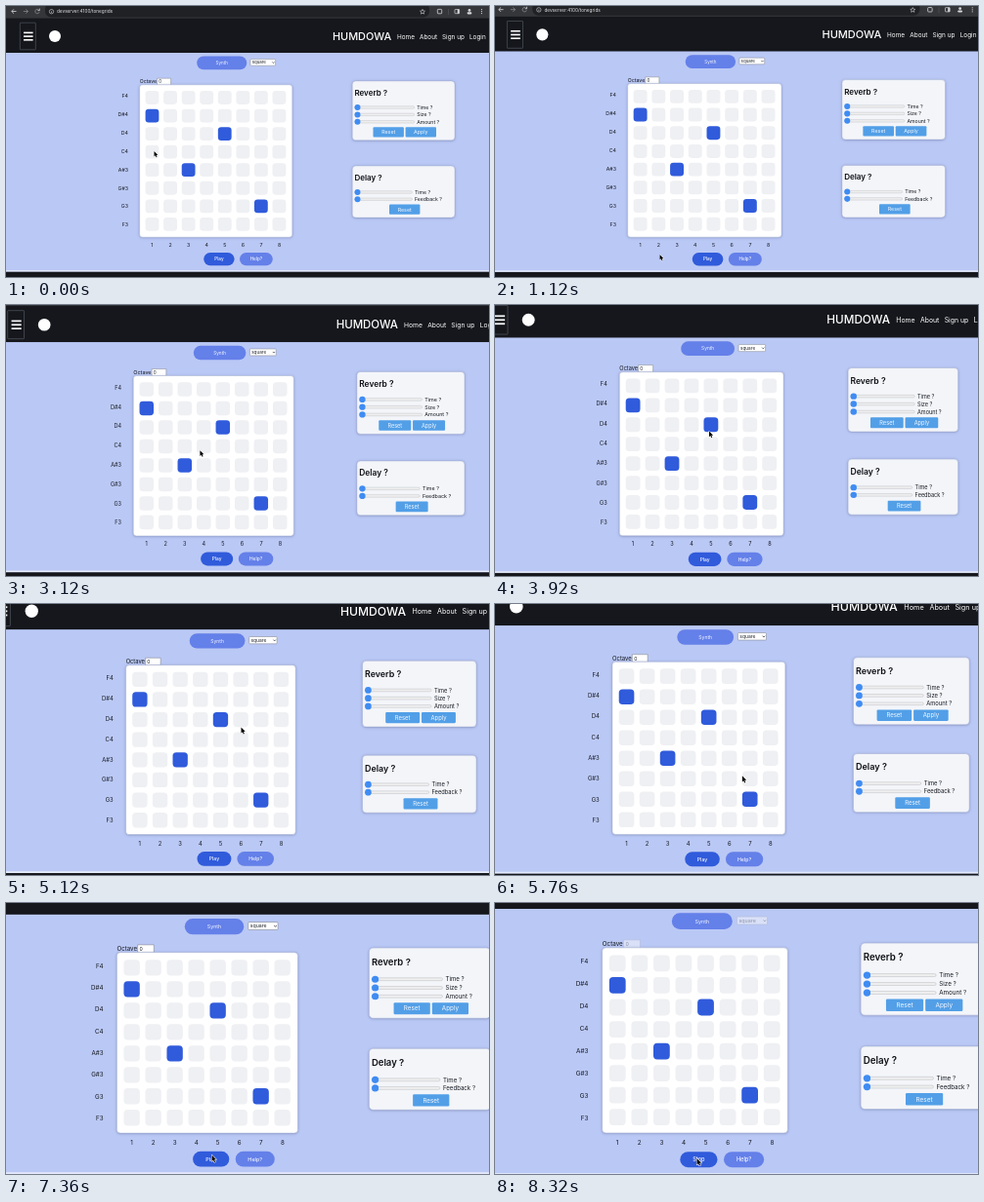
These frames come from a looping animation (494 by 278 pixels, 8400 ms). An HTML page with a canvas:

```html
<!DOCTYPE html>
<html lang="en">
<head>
<meta charset="utf-8">
<title>Step sequencer</title>
<style>
html, body { margin: 0; width: 100%; height: 100%; overflow: hidden; background: #bac8f5; }
canvas { display: block; width: 494px; height: 278px; }
</style>
</head>
<body>
<canvas id="stage"></canvas>
<script>
const W = 494, H = 278, LOOP = 8400, STEP = 80, CLICK = 7700;
const FOCUS = { x: 262, y: 243 };
const FONT = 'Inter, "Open Sans", sans-serif';
const BLUE = '#305bdb', SOFT = '#6480e9', SKY = '#529fe7', BAR = '#15171c';

// time, extra zoom, zoom speed per ms
const ZOOM = [
  [0, 0, 0], [1120, 0.0077, 1.3e-5], [2320, 0.03, 2.35e-5], [3920, 0.0745, 3e-5],
  [5120, 0.112, 3.2e-5], [6480, 0.157, 3.3e-5], [8400, 0.2178, 3e-5]
];
// time, x, y of the pointer tip
const POINTER = [
  [0, 151.5, 149], [250, 151.5, 149], [950, 168.5, 255], [1300, 168.5, 255],
  [2150, 183, 164], [2600, 183, 164], [3750, 219, 129.5], [4100, 219, 129.5],
  [5120, 240.5, 126.5], [6300, 262.5, 215], [6650, 262.5, 215],
  [7500, 206.5, 262], [8400, 206.5, 262]
];
const NOTES = ['F4', 'D#4', 'D4', 'C4', 'A#3', 'G#3', 'G3', 'F3'];
const ACTIVE = { 1: 0, 2: 4, 4: 2, 6: 6 }; // row: column

const canvas = document.getElementById('stage');
const ctx = canvas.getContext('2d');
const dpr = window.devicePixelRatio || 1;
canvas.width = Math.round(W * dpr);
canvas.height = Math.round(H * dpr);

function segment(keys, t) {
  let i = 0;
  while (i < keys.length - 2 && t >= keys[i + 1][0]) i++;
  const a = keys[i], b = keys[i + 1], span = b[0] - a[0];
  return { a, b, span, u: (t - a[0]) / span };
}

function zoomAt(t) {
  const { a, b, span, u } = segment(ZOOM, t);
  const ease = u * u * (3 - 2 * u);
  const v = u * (1 - u);
  return 1 + a[1] + (b[1] - a[1]) * ease + span * v * ((1 - u) * a[2] - u * b[2]);
}

function pointerAt(t) {
  const { a, b, u } = segment(POINTER, t);
  const k = u * u * (3 - 2 * u);
  return [a[1] + (b[1] - a[1]) * k, a[2] + (b[2] - a[2]) * k];
}

function rect(x, y, w, h, fill) {
  ctx.fillStyle = fill;
  ctx.fillRect(x, y, w, h);
}

function box(x, y, w, h, r, fill, stroke, line = 0.6) {
  ctx.beginPath();
  ctx.roundRect(x, y, w, h, r);
  if (fill) { ctx.fillStyle = fill; ctx.fill(); }
  if (stroke) { ctx.strokeStyle = stroke; ctx.lineWidth = line; ctx.stroke(); }
}

function disc(x, y, r, fill) {
  ctx.beginPath();
  ctx.arc(x, y, r, 0, Math.PI * 2);
  ctx.fillStyle = fill;
  ctx.fill();
}

function path(points, color, line = 0.8) {
  ctx.beginPath();
  points.forEach(([x, y], i) => i ? ctx.lineTo(x, y) : ctx.moveTo(x, y));
  ctx.strokeStyle = color;
  ctx.lineWidth = line;
  ctx.stroke();
}

// y is the middle of the capital letters
function text(str, x, y, size, color = '#15181f', align = 'left', weight = 400) {
  ctx.font = `${weight} ${size}px ${FONT}`;
  ctx.textAlign = align;
  ctx.fillStyle = color;
  ctx.fillText(str, x, y + size * 0.364);
}

function button(label, x, y, w, h, r, fill, size, weight = 400) {
  box(x, y, w, h, r, fill);
  text(label, x + w / 2, y + h / 2, size, '#f4f7ff', 'center', weight);
}

function card(x, y, w, h, r, fill) {
  ctx.save();
  ctx.shadowColor = 'rgba(60,75,130,0.55)';
  ctx.shadowBlur = 2.5 * dpr;
  ctx.shadowOffsetY = 0.4 * dpr;
  box(x, y, w, h, r, fill);
  ctx.restore();
  box(x, y, w, h, r, null, '#a9b4d6', 0.5);
}

function slider(label, y, end) {
  box(356.6, y - 1.2, end - 356.6, 2.4, 1.2, '#efefef', '#b5b7bd', 0.4);
  disc(359.5, y, 3, '#3f8cf3');
  text(label, end + 2.6, y, 5.15);
}

function browserBar() {
  rect(-60, -10, 620, 23, '#35363a');
  box(40, -3, 393, 14.5, 6, '#202124');
  const c = '#d5d7da';
  path([[10.5, 5.5], [5.8, 5.5]], c);
  path([[8, 3.3], [5.8, 5.5], [8, 7.7]], c);
  path([[17.8, 5.5], [22.5, 5.5]], '#85878b');
  path([[20.3, 3.3], [22.5, 5.5], [20.3, 7.7]], '#85878b');
  ctx.beginPath();
  ctx.arc(32, 5.5, 2.2, 0.3, 5.5);
  ctx.stroke();
  path([[34.3, 2.6], [34.3, 4.6], [32.4, 4.6]], c);
  ctx.beginPath();
  ctx.arc(46.5, 5.7, 2.2, 0, Math.PI * 2);
  ctx.lineWidth = 0.6;
  ctx.stroke();
  path([[46.5, 5.3], [46.5, 7]], c, 0.6);
  text('devserver:4100/tonegrids', 52, 5.7, 4.7, '#e4e6e9');

  const star = [];
  for (let i = 0; i <= 10; i++) {
    const a = i * Math.PI / 5 - Math.PI / 2, r = i % 2 ? 1.2 : 2.6;
    star.push([426 + Math.cos(a) * r, 6 + Math.sin(a) * r]);
  }
  path(star, c, 0.6);
  box(441.3, 3.4, 4.4, 4.4, 0.8, null, c, 0.8);
  path([[452.5, 3], [452.5, 9]], '#57595e', 0.6);
  box(459, 3.5, 4.6, 4.2, 0.5, null, c, 0.7);
  rect(461.7, 3.5, 1.9, 4.2, c);
  disc(474, 4.4, 1.4, c);
  box(471.6, 6.2, 4.8, 2.2, 1.1, c);
  for (let i = 0; i < 3; i++) disc(486.5, 3.6 + i * 2, 0.6, c);
}

function header() {
  rect(-60, 12.6, 620, 35.4, BAR);
  box(14.3, 17.2, 16, 27.6, 0.5, null, '#5a606a', 0.6);
  for (let i = 0; i < 3; i++) rect(18, 26.6 + i * 3.7, 9.6, 1.6, '#fff');
  disc(50, 31, 6, '#fff');
  text('HUMDOWA', 334, 31, 10.9, '#fff', 'left', 500);
  [['Home', 400], ['About', 423], ['Sign up', 446], ['Login', 474]]
    .forEach(([s, x]) => text(s, x, 31.5, 6.4, '#fff'));
}

function controls(playing) {
  button('Synth', 195.2, 51.6, 51, 13.7, 6.8, SOFT, 4.5);
  const fill = playing ? '#d9e0f8' : '#fff';
  const ink = playing ? '#8c93a6' : '#20232a';
  const edge = playing ? '#b3bcd8' : '#80858f';
  box(250, 54.6, 25.6, 6.6, 0.8, fill, edge, 0.5);
  text('square', 251.7, 57.8, 4.4, ink);
  path([[272.3, 57.4], [273.4, 58.6], [274.5, 57.4]], ink, 0.6);
  text('Octave', 136.7, 77.4, 5.2);
  rect(154.6, 74.2, 14, 7, fill);
  box(154.6, 74.2, 14, 7, 0, null, edge, 0.5);
  text('0', 156.2, 77.7, 4.4, ink);
}

function grid() {
  card(136.6, 80.8, 156.2, 156.4, 3, '#fff');
  for (let row = 0; row < 8; row++) {
    text(NOTES[row], 125, 92.4 + row * 18.85, 5.25, undefined, 'right');
    text(String(row + 1), 149.4 + row * 18.6, 245.2, 5.25, undefined, 'center');
    for (let col = 0; col < 8; col++) {
      const on = ACTIVE[row] === col;
      const x = 149.5 + col * 18.56, y = 94 + row * 18.55;
      box(x - 6.9, y - 6.9, 13.8, 13.8, 3.3, on ? BLUE : '#eff0f3');
    }
  }
}

function effects() {
  card(354.2, 76.9, 104.8, 60.9, 3.5, '#f3f5f9');
  text('Reverb ?', 356.4, 89, 8, '#0d0f14', 'left', 600);
  ['Time ?', 'Size ?', 'Amount ?'].forEach((s, i) => slider(s, 104 + i * 7.4, 417.6));
  button('Reset', 375.5, 124.2, 31.4, 10.2, 1, SKY, 5.3);
  button('Apply', 408.6, 124.2, 31.4, 10.2, 1, SKY, 5.3);

  card(354.2, 164, 104.8, 53.1, 3.5, '#f3f5f9');
  text('Delay ?', 356.4, 175.8, 8, '#0d0f14', 'left', 600);
  ['Time ?', 'Feedback ?'].forEach((s, i) => slider(s, 191 + i * 7.2, 415.4));
  button('Reset', 392, 203.6, 31.4, 10.2, 1, SKY, 5.3);
}

function pointer(t, zoom) {
  const [x, y] = pointerAt(t);
  ctx.save();
  ctx.translate(x, y);
  ctx.scale(zoom, zoom);
  ctx.beginPath();
  [[0, 0], [0, 5.4], [1.25, 4.3], [2.1, 6.2], [3, 5.8], [2.15, 3.95], [3.8, 3.85]]
    .forEach(([px, py]) => ctx.lineTo(px, py));
  ctx.closePath();
  ctx.lineWidth = 0.9;
  ctx.lineJoin = 'round';
  ctx.strokeStyle = '#fff';
  ctx.stroke();
  ctx.fillStyle = '#000';
  ctx.fill();
  ctx.restore();
}

function draw(t) {
  const zoom = zoomAt(t), playing = t >= CLICK;
  ctx.setTransform(dpr, 0, 0, dpr, 0, 0);
  rect(0, 0, W, H, '#bac8f5');
  ctx.save();
  ctx.translate(FOCUS.x, FOCUS.y);
  ctx.scale(zoom, zoom);
  ctx.translate(-FOCUS.x, -FOCUS.y);
  browserBar();
  header();
  controls(playing);
  grid();
  effects();
  button(playing ? 'Stop' : 'Play', 202.2, 253, 31.4, 13.2, 6.6, BLUE, 4.6, 500);
  button('Help?', 239, 253, 33.8, 13.2, 6.6, SOFT, 4.6, 500);
  rect(-60, 271, 620, 1.7, '#e3e9fa');
  rect(-60, 272.7, 620, 20, BAR);
  ctx.restore();
  pointer(t, zoom);
}

const start = performance.now();
function tick() {
  const t = (performance.now() - start) % LOOP;
  draw(Math.floor(t / STEP) * STEP);
  requestAnimationFrame(tick);
}
tick();
</script>
</body>
</html>
```
